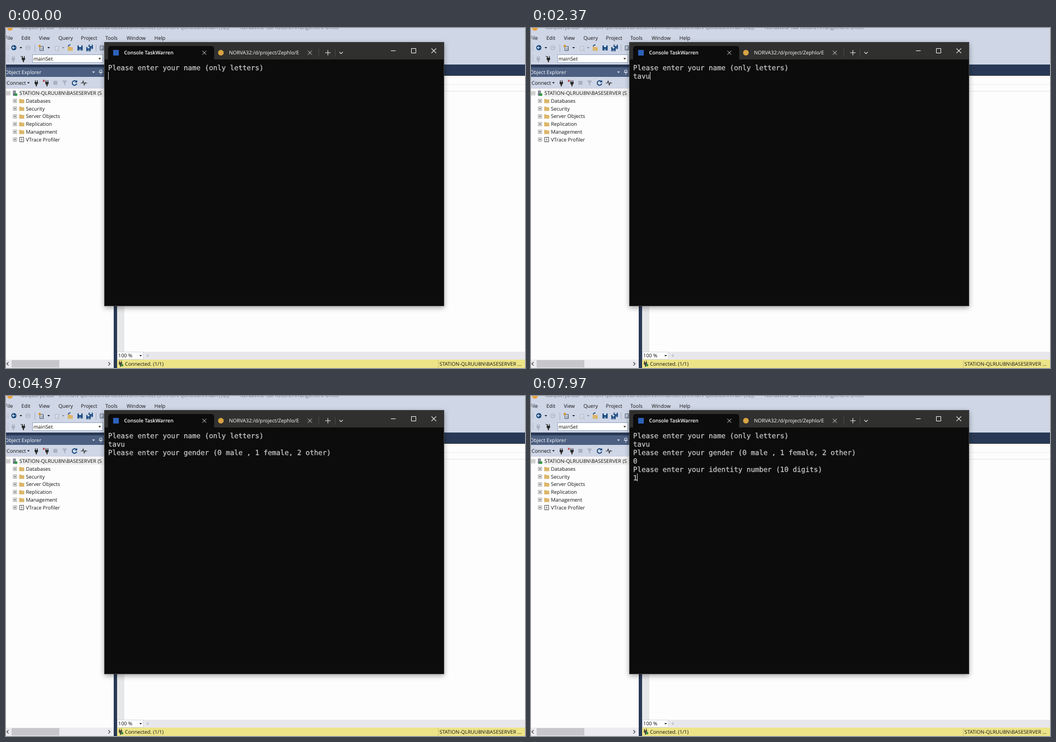
Animation, 925 px wide and 605 px high, one loop 8000 ms. Source, as an HTML page:

```html
<!DOCTYPE html>
<html lang="en">
<head>
<meta charset="utf-8">
<title>Console prompts</title>
<style>
  html, body { margin: 0; width: 100%; height: 100%; overflow: hidden; background: #fdfdfd; }
  svg { display: block; width: 925px; height: 605px; }
  text { font: 9px "Open Sans", "Noto Sans", sans-serif; text-rendering: geometricPrecision; }
  .console text { font: 12.45px "DejaVu Sans Mono", monospace; fill: #ccc; stroke: #ccc; stroke-width: .25px; }
  .bold { font-weight: 600; }
</style>
</head>
<body>
<svg id="stage" viewBox="0 0 925 605"></svg>
<script>
const LOOP = 8000, BLINK = 530;
const LINE = 15, CHAR = 7.495, LEFT = 182, TOP = 70;
const NAVY = '#293955', INK = '#111', BLUE = '#0b3f77', GREY = '#a9b0bd';
const HOST = 'STATION-QLRUU8N', SERVER = HOST + '\\BASESERVER';

const rect = (x, y, w, h, fill, extra = '') =>
  `<rect x="${x}" y="${y}" width="${w}" height="${h}" fill="${fill}" ${extra}/>`;
const circle = (x, y, r, fill) => `<circle cx="${x}" cy="${y}" r="${r}" fill="${fill}"/>`;
const stroke = (d, color, width = 1, extra = '') =>
  `<path d="${d}" fill="none" stroke="${color}" stroke-width="${width}" ${extra}/>`;
const shape = (d, fill) => `<path d="${d}" fill="${fill}"/>`;
// Text is placed by the vertical centre of its line.
const label = (x, y, str, fill = INK, extra = '') =>
  `<text x="${x}" y="${y + 3.2}" fill="${fill}" ${extra}>${str}</text>`;
const caret = (x, y, fill = INK) => shape(`M${x - 2.3} ${y - 1}h4.6l-2.3 2.6z`, fill);
const cross = (x, y, r, color, width) =>
  stroke(`M${x - r} ${y - r}l${2 * r} ${2 * r}m0 ${-2 * r}l${-2 * r} ${2 * r}`, color, width);
const grip = y => stroke(`M3.5 ${y - 5}v11`, '#9ba6bd', 2, 'stroke-dasharray="1 2"');
const plug = (x, y, color) =>
  shape(`M${x - 3} ${y - 2}h6v2.5q0 2-2 2.3v3h-2v-3q-2-.3-2-2.3z`, color) +
  stroke(`M${x - 1.6} ${y - 5}v3m3.2-3v3`, color, 1.2);
const floppy = (x, y, s) =>
  rect(x - s / 2, y - s / 2, s, s, BLUE) +
  rect(x - s / 4, y - s / 2, s / 2, s * .35, '#d5ddec') +
  rect(x - s / 4, y + s / 8, s / 2, s * .375, '#6f8cb3');
const folder = (x, y, fill = '#dcb567') =>
  shape(`M${x - 4.5} ${y - 3.5}h3.5l1 1h4.5v6.5h-9z`, fill);
const page = (x, y, color) =>
  rect(x - 3, y - 3, 6, 7, '#e6eaf3', `stroke="${color}"`) +
  stroke(`M${x - 1} ${y}h3m-3 2h3`, color, .8);
const toggle = (x, y, plus) =>
  rect(x - 3, y - 3, 6, 6, '#fff', 'stroke="#8a8a8a" stroke-width=".8"') +
  stroke(`M${x - 2} ${y}h4` + (plus ? `M${x} ${y - 2}v4` : ''), '#444', .8);

function topBars() {
  const menu = { File: -2, Edit: 27.5, View: 58.5, Query: 93.5, Project: 133.5, Tools: 177, Window: 215, Help: 264.5 };
  return rect(0, 0, 925, 65, '#cfd6e6') +
    circle(7, 0, 5, '#e9a13b') +
    label(24, -1, `TabQuery2.tab - ${SERVER}.mainSet (${HOST}\\main (52))`, '#6d7483') +
    label(411, -1, '- Nordavelo Tab Record Arrangement Office', '#6d7483') +
    Object.entries(menu).map(([name, x]) => label(x, 17.5, name)).join('') +
    grip(35) + circle(14, 35, 4.6, BLUE) + stroke('M17 35h-5.5m2.3-2.3l-2.3 2.3l2.3 2.3', '#fff', 1.1) +
    caret(26.5, 35) +
    `<circle cx="39" cy="35" r="4" fill="none" stroke="${GREY}"/>` +
    stroke('M36.7 35h4.5m-1.8-1.8l1.8 1.8l-1.8 1.8', GREY) +
    stroke('M51.5 29v13M160.5 29v13', '#a5b0c8') +
    page(63.5, 36, '#3b4a63') + circle(60, 32, 2.2, '#d39a35') + caret(76, 35) +
    page(91, 36, GREY) + caret(102, 35, '#7f8898') +
    folder(114.5, 36.5) + stroke('M111 33q0-3 4-3', BLUE, 1.3) +
    floppy(132, 35.5, 9) + floppy(151, 33.5, 7.5) + floppy(147, 37.5, 7.5) +
    page(171, 35, '#3b4a63') +
    grip(54) + plug(13, 55, GREY) + plug(31, 55, '#2b2b2b') + stroke('M26 50l3 2', '#2b2b2b') +
    rect(47.5, 47.5, 125, 14, '#fff', 'stroke="#98a6c4"') + label(49, 55, 'mainSet') + caret(167, 54.5);
}

function explorer() {
  const names = ['Databases', 'Security', 'Server Objects', 'Replication', 'Management'];
  const rowY = i => 116 + 13.75 * i;
  const rows = names.map((name, i) => {
    const y = rowY(i + 1);
    return toggle(16, y, true) + folder(28, y) + label(35.5, y, name);
  }).join('');
  const last = rowY(6);
  return rect(0, 65, 198, 540, NAVY) +
    rect(0, 70, 192, 17, '#4d6082') + label(-2, 79, 'Object Explorer', '#fff') +
    caret(156, 78.5, '#fff') + stroke('M167 75h4v4h-4zM165.5 79h7M169 79v4', '#e6ebf5') +
    rect(0, 87, 192, 21, '#cfd6e6') + label(1, 98, 'Connect') + caret(40, 97.5) +
    plug(54, 98, '#2b2b2b') + plug(73, 98, '#2b2b2b') + cross(67.5, 94, 1.7, '#b3282d', 1.2) +
    rect(84.5, 94, 7, 7, GREY) + shape('M100 93.5h9l-3.5 4.5v4.5l-2-1.5v-3z', GREY) +
    stroke('M125.3 95.5a4 4 0 1 0 .7 3.3', BLUE, 1.6) + shape('M126.8 92.5v4.3h-4.3z', BLUE) +
    stroke('M133.5 98h2.5l1.5-3.5l2 7l1.5-4.5l1 1h2.5', '#2b2b2b', 1.1) +
    rect(0, 108, 192, 482, '#fdfdfd') + rect(22.5, 109.5, 168, 13, '#f0f0f0') +
    toggle(4, rowY(0), false) +
    rect(12.5, 111.5, 5, 9, '#5d6673') + stroke('M13.5 113.5h3m-3 2h3', '#fff', .7) + circle(17.8, 118.5, 2.6, '#35a04a') +
    label(24, rowY(0), SERVER + ' (S') + rows +
    toggle(16, last, true) + rect(24.5, last - 4, 7, 8, '#fff', 'stroke="#555"') +
    stroke(`M28.5 ${last - 3}l-1.5 3h2l-1.5 3`, '#555', .8) + label(35.5, last, 'VTrace Profiler') +
    rect(0, 590, 192, 15, '#ececf0') + rect(10, 591, 85, 13, '#c6c6cb') +
    stroke('M4.5 594.5l-3 3l3 3M182.5 594.5l3 3l-3 3', '#444', 1.2);
}

function editor() {
  return rect(198, 65, 727, 20, NAVY) + rect(198, 85, 727, 505, '#fdfdfd') +
    rect(198, 85, 727, 1, '#fbf4d0') + rect(198, 100, 727, 1, '#ececf0') + rect(198, 112, 727, 1, '#e4e4ec') +
    rect(198, 113, 13, 463, '#e6e7e8') +
    rect(198, 576, 727, 14, '#e8e8ec') + rect(198.5, 576.5, 46, 13, '#fdfdfd', 'stroke="#d5d8e2"') +
    label(200, 583, '100 %') + caret(240, 583) + shape('M254 580v6l-4-3z', '#c2c4cc') +
    rect(198, 590, 727, 15, '#ede488') + plug(204, 597, '#4b4b3a') + rect(205, 598, 4, 4, '#3f8f46') +
    label(212, 597.5, 'Connected. (1/1)') + stroke('M770.5 591v14', '#c9c07a') +
    label(772.5, 597.5, SERVER + ' ...');
}

function consoleWindow() {
  return '<defs><filter id="soft" x="-10%" y="-10%" width="120%" height="120%"><feGaussianBlur stdDeviation="5"/></filter></defs>' +
    rect(175, 28, 606, 470, '#000', 'opacity=".35" filter="url(#soft)"') +
    rect(175, 25, 606, 470, '#0c0c0c') + rect(175, 25, 606, 31, '#30302f') +
    shape('M182 56V37q0-5 5-5h179q5 0 5 5v19z', '#0c0c0c') +
    stroke('M175.5 25.5H780.5V494.5H175.5z', '#3c3c3c') +
    rect(191, 39, 10, 10, '#2c62b8') + label(210.5, 44, 'Console TaskWarren', '#fff', 'class="bold"') +
    cross(353.5, 44, 3.5, '#ddd') +
    circle(383, 44, 5, '#d9a441') + label(397.5, 44, 'NORVA32:/d/project/Zephlo/E', '#fff') +
    cross(541.5, 44, 3.5, '#ddd') +
    stroke('M557.5 37v14M586.5 37v14', '#4a4a4a') + stroke('M569 44h9.5M573.7 39.2v9.5', '#e8e8e8') +
    stroke('M594 42.7l3.2 3l3.2-3', '#e8e8e8', 1.1) +
    stroke('M686 40.5h8.5M722.5 36.5h8v8h-8z', '#f2f2f2') + cross(762.5, 40.5, 4.2, '#f2f2f2', 1.1);
}

// Each key press adds text at its time; Enter also prints the next question.
const keys = [
  [0, 'Please enter your name (only letters)\n'],
  [1000, 't'], [1240, 'a'], [1480, 'v'], [1900, 'u'],
  [4380, '\nPlease enter your gender (0 male , 1 female, 2 other)\n'],
  [5750, '0'],
  [7000, '\nPlease enter your identity number (10 digits)\n'],
  [7700, '1'],
];

const stage = document.getElementById('stage');
stage.innerHTML = topBars() + explorer() + editor() + consoleWindow() + '<g class="console"></g>';
const output = stage.querySelector('.console');
let shown = '';

function draw(now) {
  const time = now % LOOP;
  const pressed = keys.filter(([at]) => at <= time);
  const lines = pressed.map(([, str]) => str).join('').split('\n');
  const idle = time - pressed.at(-1)[0];
  const cursorOn = Math.floor(idle / BLINK) % 2 === 0;
  const row = lines.length - 1;
  const markup = lines.map((str, i) => `<text x="${LEFT}" y="${TOP + 4.7 + LINE * i}">${str}</text>`).join('') +
    (cursorOn ? rect(Math.round(LEFT + CHAR * lines[row].length), TOP - 7 + LINE * row, 1, 14, '#ccc') : '');
  if (markup !== shown) output.innerHTML = shown = markup;
  requestAnimationFrame(draw);
}
draw(0);
</script>
</body>
</html>
```
